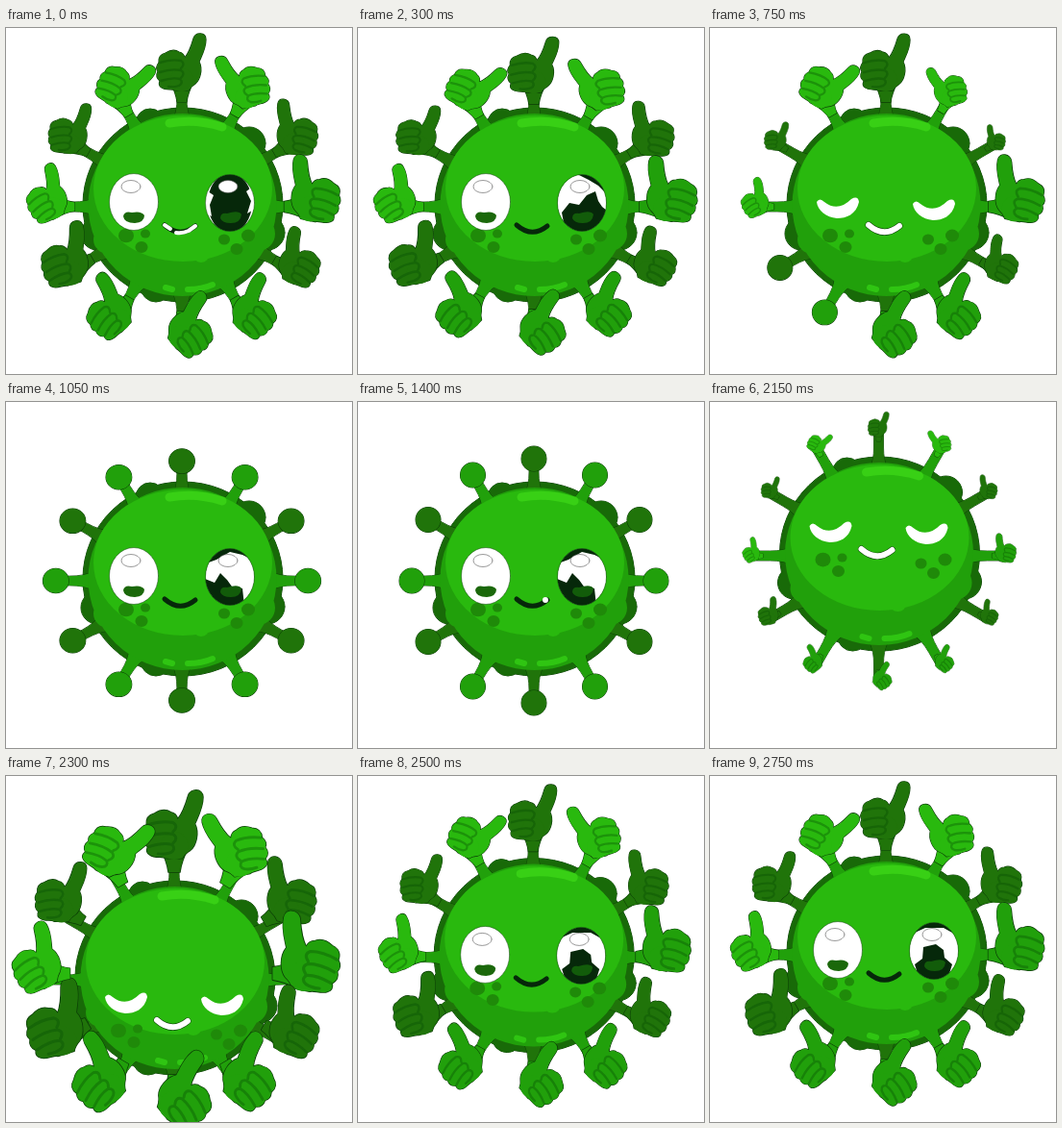
Recreate the animation shown at these times as an HTML page with a canvas. Size 360 by 360 pixels, loop 2.8 s.

```html
<!DOCTYPE html>
<html lang="en">
<head>
<meta charset="utf-8">
<title>Thumbs up virus</title>
<style>
html, body { margin: 0; width: 100%; height: 100%; overflow: hidden; background: #fff; }
canvas { display: block; width: 360px; height: 360px; }
</style>
</head>
<body>
<canvas id="stage" width="360" height="360"></canvas>
<script>
const LOOP = 2800, CX = 183, CY = 186;
const BRIGHT = '#29b90e', MID = '#21a00b', DARK = '#20740a', RIM = '#186a08', INK = '#06280a', EDGE = '#0b3d06';
const c = document.getElementById('stage').getContext('2d');
c.lineCap = c.lineJoin = 'round';

// side (1: thumb on the right), tilt, size, time of retraction, colour
const HANDS = [
  [1, 0, 1, 780, DARK], [-1, -12, .98, 685, BRIGHT], [-1, 10, .92, 645, DARK],
  [-1, 12, 1.1, 790, MID], [-1, 27, .92, 695, DARK], [-1, 44, .98, 810, MID],
  [-1, 51, 1, 800, MID], [1, -46, 1, 520, MID], [1, -17, 1.05, 530, DARK],
  [1, -29, .9, 675, BRIGHT], [1, 0, .87, 660, DARK], [1, 28, .95, 770, BRIGHT]
];

const HAND = new Path2D('M-7 13C-10 11-17 13-21 10Q-25 8-23 3Q-28-1-25-7Q-28-11-24-16Q-25-24-17-26Q-9-31-3-27Q2-26 3-21C8-27 10-34 12-41C14-48 25-48 25-40C25-31 21-24 18-17C22-9 19 2 14 6Q9 9 7 13Z');
const FINGERS = new Path2D('M-23-16Q-11-20-1-18Q4-15-1-10M-23-6Q-11-10-1-8Q4-5-1 0M-22 3Q-10-1-2 1Q2 5-3 8Q-8 10-14 9');
const CUFF = new Path2D('M-5 25Q-6 16-13 2H13Q6 16 5 25Z');
const STEM = new Path2D('M-9-91Q-5-99-5-113V-128H5V-113Q5-99 9-91Z');
const SHUT = new Path2D('M111 181Q114 176 119 181Q133 192 147 178Q154 174 155 181C152 194 142 198 132 198C121 197 112 190 111 181Z');
const SMILE = new Path2D('M165 205Q181 219 197 206');

// rise, hover with closed eyes, then slam down as the hands pop out
const BOB_X = [[1650, 0], [1850, -6], [2300, -8], [2550, 0]];
const BOB_Y = [[1650, 0], [1850, -24], [2170, -26], [2300, 26], [2550, 0]];
const LOOK = [[1650, 0], [1850, -26], [2170, -26], [2300, 23], [2550, 0]];
const GROW = [[2050, 0], [2300, 1.2], [2500, .98], [2650, 1]];

function at(keys, t) {
  let [t0, v0] = keys[0];
  if (t <= t0) return v0;
  for (const [t1, v1] of keys) {
    if (t < t1) {
      const p = (t - t0) / (t1 - t0);
      return v0 + (v1 - v0) * p * p * (3 - 2 * p);
    }
    [t0, v0] = [t1, v1];
  }
  return v0;
}

function fill(color, path) {
  c.fillStyle = color;
  c.fill(path);
}

function line(color, width, path) {
  c.strokeStyle = color;
  c.lineWidth = width;
  c.stroke(path);
}

function oval(x, y, rx, ry = rx) {
  const p = new Path2D();
  p.ellipse(x, y, rx, ry, 0, 0, 7);
  return p;
}

function lumpy(base, lumps) {
  for (const [x, y, r] of lumps) base.addPath(oval(x, y, r));
  return base;
}

const RIM_SHAPE = lumpy(oval(184, 184, 104, 101), [[150, 99, 15], [253, 120, 17], [272, 213, 18], [156, 269, 16], [95, 214, 17]]);
const BODY_SHAPE = lumpy(oval(183.5, 184, 98, 95), [[262, 214, 18], [106, 220, 15]]);
const BRIGHT_SHAPE = lumpy(oval(184, 167, 93, 76), [[203, 235, 9]]);

function stem(i) {
  c.save();
  c.translate(CX, CY);
  c.rotate(i * Math.PI / 6);
  line(EDGE, .8, STEM);
  fill(i % 2 ? MID : DARK, STEM);
  c.restore();
}

function tip([side, tilt, size, leave, color], i, t) {
  const s = t < 1600 ? at([[leave, 1], [leave + 200, 0]], t) : at(GROW, t);
  const a = i * Math.PI / 6, r = 127 + 7 * s;
  c.save();
  c.translate(CX + r * Math.sin(a), CY - r * Math.cos(a));
  if (s < .3) {
    const knob = oval(0, 0, 13 - 20 * s);
    line(EDGE, 1, knob);
    fill(i % 2 ? MID : DARK, knob);
  } else {
    c.scale(s * size, s * size);
    c.save();
    c.rotate(a);
    line(EDGE, 1.2, CUFF);
    fill(color, CUFF);
    c.restore();
    c.rotate(tilt * Math.PI / 180);
    c.scale(side, 1);
    line(EDGE, 1.2, HAND);
    fill(color, HAND);
    // the wrist joint stays free of the outline
    fill(color, oval(0, 2, 12));
    line('rgba(5,75,3,.35)', 2.4, FINGERS);
  }
  c.restore();
}

function body() {
  fill(MID, BODY_SHAPE);
  fill(BRIGHT, BRIGHT_SHAPE);
  line('#38d015', 9, new Path2D('M170 99Q198 94 225 103'));
  line('#2fc512', 6, new Path2D('M166 270L173 272M189 272Q204 272 215 267'));
}

function cheeks() {
  for (const [x, y, r] of [[125, 216, 8], [145, 214, 5], [141, 228, 6.5], [227, 220, 6], [252, 216, 7], [240, 230, 6.5]])
    fill('#1f8a09', oval(x, y, r, r * .92));
}

function shine(x) {
  const p = oval(x, 165, 10, 6.5);
  fill('#fff', p);
  line('#555', .6, p);
}

function openEyes(t) {
  const left = oval(133, 181, 25.5, 29.5), right = oval(233, 182, 25.5, 29.5);
  fill('#fff', left);
  line(EDGE, .5, left);
  fill('#1b680b', new Path2D('M122 196Q123 190 131 192Q141 190 144 195Q144 202 134 203Q123 203 122 196Z'));
  shine(130);

  c.save();
  c.clip(right);
  fill('#fff', right);
  if (t < 150) {
    fill(INK, oval(233, 182, 23, 31));
    fill('#fff', new Path2D('M207 168L216 174L212 184L214 196L207 192ZM258 164L250 170L255 180L251 193L259 188Z'));
  } else if (t < 650) {
    fill(INK, new Path2D('M212 192L220 182L230 184L238 174L247 170L250 180L254 186L259 190L247 213H216ZM226 151H258V172L250 164L240 158Z'));
  } else if (t < 1900) {
    fill(INK, new Path2D('M208 151H258V165L246 159L233 156L219 164L208 168ZM207 184L217 188L223 178L230 185L235 192L246 194L248 212H206Z'));
  } else {
    fill(INK, new Path2D('M213 196L221 190L222 178L235 175L243 181L244 189L252 196L247 212H218ZM213 163L220 151H249L252 163L243 158H224Z'));
  }
  fill('#125c0a', new Path2D('M223 198Q223 192 230 193Q242 189 245 194Q244 203 234 203Q225 203 223 198Z'));
  c.restore();
  line(EDGE, .5, right);
  shine(231);
}

function shutEyes(t) {
  for (const x of [0, 100]) {
    const dark = x && t > 1800 && t < 2000;
    c.save();
    c.translate(x, x / 50);
    fill(dark ? INK : '#fff', SHUT);
    if (dark) fill('#fff', new Path2D('M139 187L147 178Q154 174 155 181Q153 189 145 195L139 192Z'));
    c.restore();
  }
}

function mouth(t, shut) {
  if (shut) {
    line('#0d4607', 7, SMILE);
    line('#fff', 6, SMILE);
    return;
  }
  line(INK, 5, SMILE);
  if (t < 150) line('#fff', 4, new Path2D('M165 205L171 209M177 213Q184 214 190 211L197 206'));
  else if (t > 1200 && t < 1700) fill('#fff', oval(195, 206, 3));
}

// widens and flattens the ring of arms around its centre
function breathe(t) {
  const b = t < 1650 ? Math.sin(t / 700 * Math.PI) ** 2 : 0;
  c.translate(CX, CY);
  c.scale(1 + .033 * b, 1 - .02 * b);
  c.translate(-CX, -CY);
}

function draw(now) {
  const t = now % LOOP;
  const x = at(BOB_X, t), y = at(BOB_Y, t);
  const shut = t >= 650 && t < 850 || t >= 1750 && t < 2450;
  c.clearRect(0, 0, 360, 360);
  c.save();
  c.translate(x, y);
  line(EDGE, 1, RIM_SHAPE);
  fill(RIM, RIM_SHAPE);
  c.save();
  breathe(t);
  HANDS.forEach((_, i) => stem(i));
  c.restore();
  body();
  c.save();
  c.translate(0, at(LOOK, t));
  cheeks();
  if (shut) shutEyes(t);
  else openEyes(t);
  mouth(t, shut);
  c.restore();
  // hands trail the body slightly on the way down
  if (y > 0) c.translate(0, -y * .25);
  breathe(t);
  HANDS.forEach((h, i) => tip(h, i, t));
  c.restore();
}

const start = performance.now();
function tick() {
  draw(performance.now() - start);
  requestAnimationFrame(tick);
}
tick();
</script>
</body>
</html>
```
